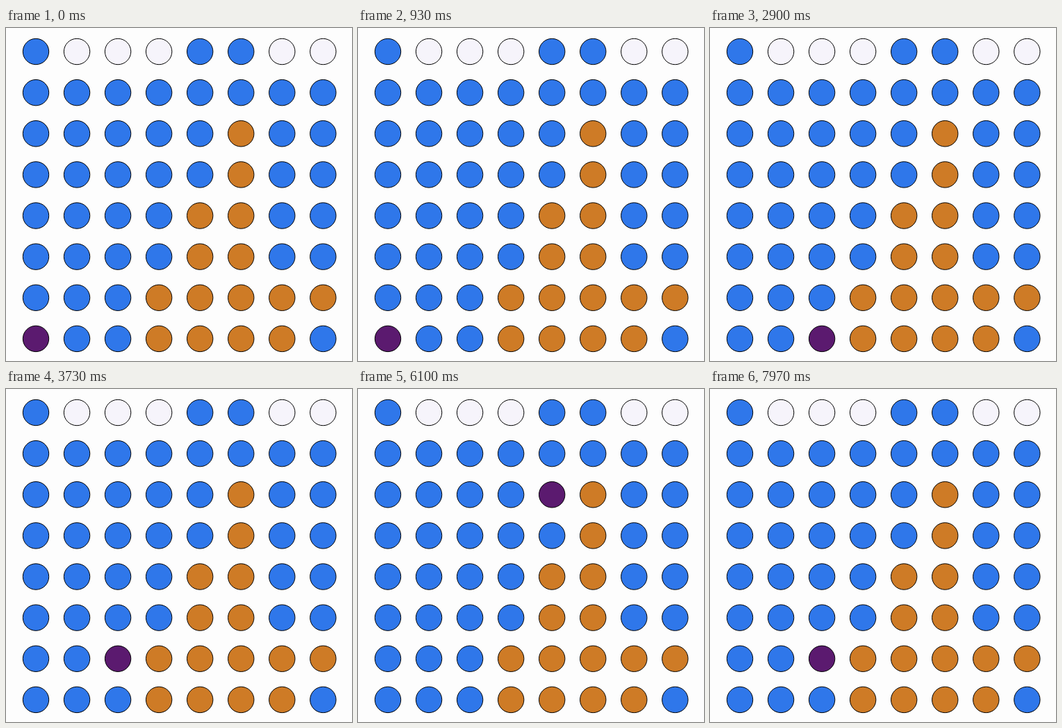
An HTML page that plays this animation: 498 by 480 pixels, repeating every 8000 ms.

```html
<!DOCTYPE html>
<html lang="en">
<head>
<meta charset="utf-8">
<title>Grid walk</title>
<style>
  html, body { margin: 0; width: 100%; height: 100%; overflow: hidden; background: #fdfdfd; }
  svg { display: block; width: 498px; height: 480px; }
  circle { stroke: #000; stroke-width: 1; }
</style>
</head>
<body>
<svg id="stage" viewBox="0 0 498 480"></svg>
<script>
const LOOP = 8000;
const SIZE = 8;
const FLOOR = '#2f77ea';
const HILL = '#ce7b26';
const OPEN = '#f6f4fb';
const WALKER = '#5b1a6f';

// Turning points of the walk; cells between them are interpolated
const TURNS = [
  { at: 0, col: 0, row: 7 },
  { at: 2400, col: 0, row: 7 },
  { at: 2800, col: 2, row: 7 },
  { at: 3500, col: 2, row: 7 },
  { at: 4570, col: 3, row: 3 },
  { at: 5200, col: 3, row: 3 },
  { at: 5800, col: 4, row: 2 },
  { at: 6130, col: 4, row: 2 },
  { at: 6600, col: 1, row: 2 },
  { at: 6900, col: 2, row: 3 },
  { at: 7900, col: 2, row: 6 },
  { at: LOOP, col: 2, row: 6 }
];

const stage = document.getElementById('stage');

// The hill climbs two rows per column, then drops to a low ledge
function cellFill(col, row) {
  if (row === 0 && col % 5 % 4 > 0) return OPEN;
  const top = col < 6 ? 12 - 2 * col : 6;
  const corner = col === SIZE - 1 && row === SIZE - 1;
  return col > 2 && row >= top && !corner ? HILL : FLOOR;
}

function addDot(col, row) {
  const dot = document.createElementNS('http://www.w3.org/2000/svg', 'circle');
  dot.setAttribute('cx', 43 + col * 59.05);
  dot.setAttribute('cy', 34 + row * 59.13);
  dot.setAttribute('r', 18.7);
  dot.setAttribute('fill', cellFill(col, row));
  stage.appendChild(dot);
  return dot;
}

const dots = Array.from({ length: SIZE }, (_, row) =>
  Array.from({ length: SIZE }, (_, col) => addDot(col, row)));

function walkerDot(time) {
  const next = TURNS.findIndex(turn => turn.at > time);
  const a = TURNS[next - 1], b = TURNS[next];
  const part = (time - a.at) / (b.at - a.at);
  const cell = key => Math.round(a[key] + (b[key] - a[key]) * part);
  return dots[cell('row')][cell('col')];
}

let last = dots[7][0];

function update(time) {
  last.setAttribute('fill', FLOOR);
  last = walkerDot(time);
  last.setAttribute('fill', WALKER);
}

const begin = performance.now();

function tick() {
  update(Math.max(0, performance.now() - begin) % LOOP);
  requestAnimationFrame(tick);
}

tick();
</script>
</body>
</html>
```
